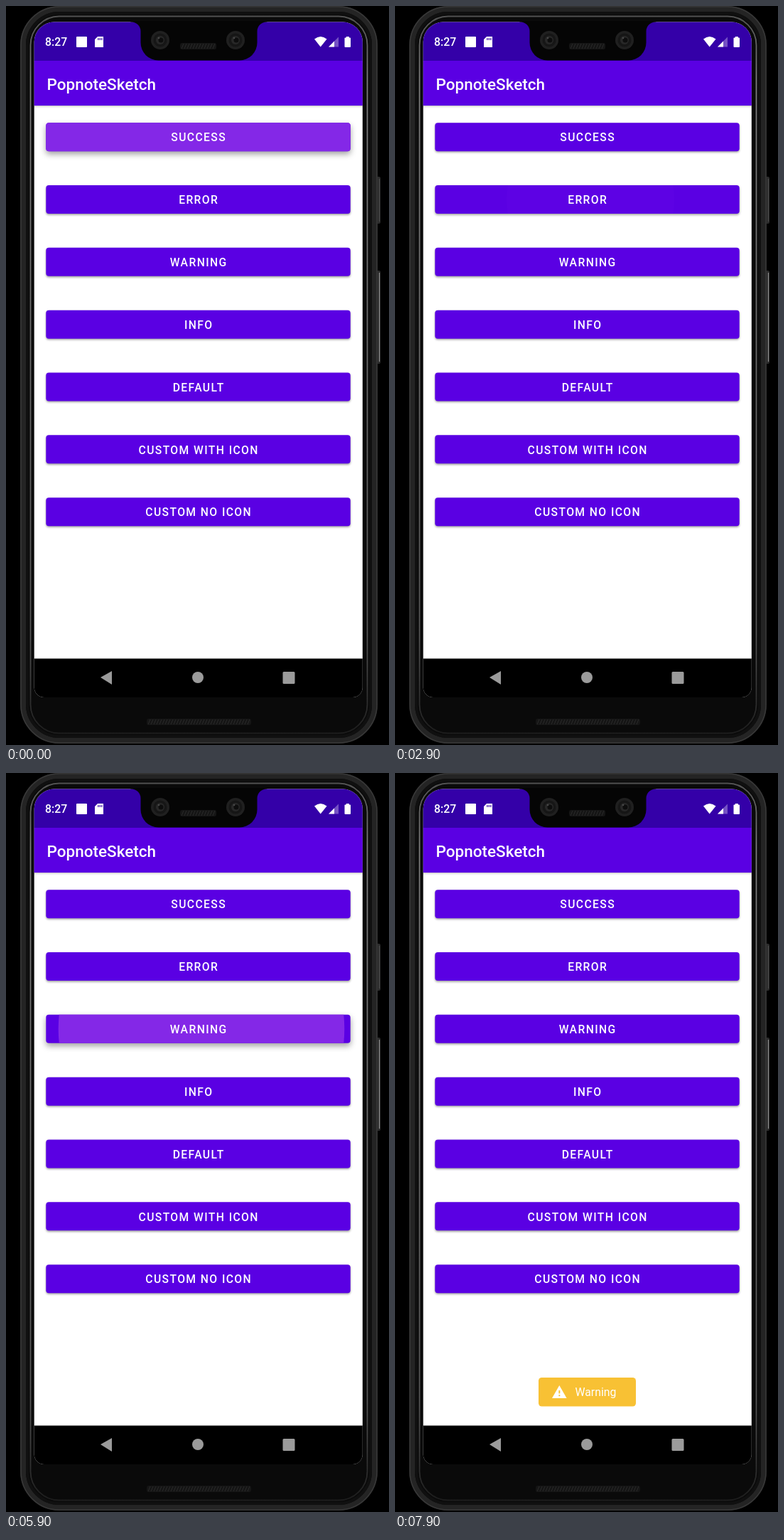
These frames come from a looping animation (539 by 1039 pixels, 8 s). An HTML page with a canvas:

```html
<!DOCTYPE html>
<html lang="en">
<head>
<meta charset="utf-8">
<title>Toast demo</title>
<style>
html, body { margin: 0; width: 100%; height: 100%; overflow: hidden; background: #000; }
canvas { display: block; width: 539px; height: 1039px; }
</style>
</head>
<body>
<canvas id="stage" width="539" height="1039"></canvas>
<script>
const ctx = document.getElementById('stage').getContext('2d');
const LOOP = 8000, STEP = 100;
const PURPLE = '#5a00e3', PRESSED = '#8428e7', DARK = '#3400a8';
const LABELS = ['SUCCESS', 'ERROR', 'WARNING', 'INFO', 'DEFAULT', 'CUSTOM WITH ICON', 'CUSTOM NO ICON'];
const PRESSES = [{ row: 0, at: -255 }, { row: 1, at: 2895 }, { row: 2, at: 5785 }];
const TOASTS = [
  { text: 'Success', color: '#23c426', x: 201, w: 138, tx: 253, icon: checkIcon, show: 500, hide: 2050, gone: 2450 },
  { text: 'Error', color: '#be2c3c', x: 214, w: 113, tx: 265.5, icon: errorIcon, show: 3700, hide: 5050, gone: 5500 },
  { text: 'Warning', color: '#f8c134', x: 202, w: 137, tx: 253.5, icon: warningIcon, show: 6400, hide: 9000, gone: 9400 }
];

const clamp = v => Math.max(0, Math.min(1, v));
const easeOut = (v, power) => 1 - Math.pow(1 - clamp(v), power);

function rounded(x, y, w, h, r) {
  ctx.beginPath();
  ctx.roundRect(x, y, w, h, r);
}

function box(x, y, w, h, r, color) {
  rounded(x, y, w, h, r);
  ctx.fillStyle = color;
  ctx.fill();
}

function ring(x, y, w, h, r, color, width) {
  rounded(x, y, w, h, r);
  ctx.strokeStyle = color;
  ctx.lineWidth = width;
  ctx.stroke();
}

function disc(x, y, r, color) {
  ctx.beginPath();
  ctx.arc(x, y, r, 0, Math.PI * 2);
  ctx.fillStyle = color;
  ctx.fill();
}

function trace(points) {
  ctx.beginPath();
  points.forEach(([x, y]) => ctx.lineTo(x, y));
}

function poly(points, color) {
  trace(points);
  ctx.closePath();
  ctx.fillStyle = color;
  ctx.fill();
}

function line(points, color, width) {
  trace(points);
  ctx.strokeStyle = color;
  ctx.lineWidth = width;
  ctx.stroke();
}

function label(text, x, y, size, weight, spacing = 0, align = 'left') {
  ctx.font = `${weight} ${size}px Roboto, sans-serif`;
  ctx.letterSpacing = spacing + 'px';
  ctx.textAlign = align;
  ctx.fillStyle = '#fff';
  ctx.fillText(text, x, y);
}

function withShadow(alpha, blur, dy, draw) {
  ctx.save();
  ctx.shadowColor = `rgba(0,0,0,${alpha})`;
  ctx.shadowBlur = blur;
  ctx.shadowOffsetY = dy;
  draw();
  ctx.restore();
}

function mesh(x, y, w, h) {
  box(x, y, w, h, 3, '#151515');
  for (let i = 2; i < w - 2; i += 4) {
    line([[x + i, y + h - 1], [x + i + 3, y + 1]], '#2a2a2a', 1);
  }
}

// A rounded outline that follows the phone's edge at a given inset.
function rim(inset, color, width) {
  ring(20 + inset, inset, 503 - inset * 2, 1037 - inset * 2, 55 - inset, color, width);
}

function drawBody() {
  ctx.fillStyle = '#000';
  ctx.fillRect(0, 0, 539, 1039);
  for (const [y, h, color] of [[240, 66, '#4a4a4a'], [372, 131, '#8c8c8c']]) {
    box(521, y, 6, h, 2, '#2c2c2c');
    line([[525.5, y + 3], [525.5, y + h - 3]], color, 1.2);
  }
  box(20, 0, 503, 1037, 55, '#0a0a0a');
  rim(4, '#242424', 8);
  rim(1, '#383838', 1.5);
  rim(10, '#101010', 4);
  const shine = ctx.createLinearGradient(0, 0, 0, 1039);
  shine.addColorStop(0, '#4a4a4a');
  shine.addColorStop(0.1, '#7c7c7c');
  shine.addColorStop(0.85, '#555');
  shine.addColorStop(1, '#161616');
  rim(14.5, shine, 1.8);
  mesh(198, 1002, 147, 9);
}

function drawStatus() {
  ctx.fillStyle = DARK;
  ctx.fillRect(39, 22, 464, 55);
  label('8:27', 55, 56, 15.8, 500);
  box(99, 43, 15, 15, 1, '#fff');

  poly([[129, 43], [137, 43], [137, 58], [125, 58], [125, 47]], '#fff');
  for (let i = 0; i < 3; i++) {
    ctx.fillStyle = DARK;
    ctx.fillRect(129.2 + i * 2.5, 45, 1.2, 3);
  }

  ctx.beginPath();
  ctx.moveTo(434, 46.5);
  ctx.quadraticCurveTo(442.7, 39.5, 451.5, 46.5);
  ctx.lineTo(442.7, 57.5);
  ctx.closePath();
  ctx.fillStyle = '#fff';
  ctx.fill();

  poly([[454, 57.5], [468, 43.5], [468, 57.5]], 'rgba(255,255,255,.32)');
  poly([[454, 57.5], [462, 49.5], [462, 57.5]], '#fff');
  box(476.5, 44.5, 8.5, 13.5, 1, '#fff');
  box(478.8, 43, 4, 2, 0, '#fff');
}

function drawNotch() {
  ctx.beginPath();
  ctx.moveTo(172, 21);
  ctx.lineTo(176, 22.5);
  ctx.arcTo(189.5, 22.5, 189.5, 36, 13);
  ctx.arcTo(189.5, 76.5, 216, 76.5, 25);
  ctx.arcTo(353.5, 76.5, 353.5, 50, 25);
  ctx.arcTo(353.5, 22.5, 367, 22.5, 13);
  ctx.lineTo(371, 21);
  ctx.closePath();
  ctx.fillStyle = '#050505';
  ctx.fill();
  for (const x of [217, 323]) {
    disc(x, 48, 13, '#202020');
    disc(x, 48, 9.5, '#161616');
    disc(x, 48, 6, '#282828');
    disc(x + 1, 48, 3.5, '#0d0d0d');
    disc(x - 2, 45, 1.3, '#484848');
  }
  mesh(245, 52, 51, 9);
}

function drawNav() {
  ctx.fillStyle = '#000';
  ctx.fillRect(39, 917.5, 464, 55);
  poly([[133, 944], [149, 935], [149, 954]], '#9b9b9b');
  disc(270, 944, 8, '#9b9b9b');
  box(389.5, 936, 17, 17, 1.5, '#9b9b9b');
}

function pressState(row, t) {
  for (const p of PRESSES) {
    const age = t - p.at;
    if (p.row !== row || age < 0 || age > 600) continue;
    const fade = 1 - clamp((age - 300) / 290);
    return {
      alpha: clamp(age / 75) * fade,
      lift: clamp(age / 100) * fade,
      radius: 112 + 108 * easeOut(age / 260, 3)
    };
  }
  return null;
}

function drawButton(row, t) {
  const x = 56.3, y = 164.2 + row * 87.83, w = 428.4, h = 40;
  const press = pressState(row, t);
  const lift = press ? press.lift : 0;
  withShadow(0.38, 3 + lift * 6, 1.6 + lift * 2.4, () => box(x, y, w, h, 4, PURPLE));
  if (press) {
    ctx.save();
    rounded(x, y, w, h, 4);
    ctx.clip();
    ctx.globalAlpha = press.alpha;
    disc(275, y + h / 2, press.radius, PRESSED);
    ctx.restore();
  }
  label(LABELS[row], x + w / 2 + 0.7, y + 26.2, 15.7, 500, 1.4, 'center');
}

function checkIcon() {
  line([[222.5, 870.5], [227.8, 875.8], [238.8, 864.8]], '#fff', 1.8);
}

function errorIcon() {
  ring(234, 861, 18, 18, 9, '#fff', 1.9);
  ctx.fillStyle = '#fff';
  ctx.fillRect(242, 865.3, 2, 6);
  ctx.fillRect(242, 873, 2, 2);
}

function warningIcon(color) {
  poly([[221, 879], [231.3, 861], [241.6, 879]], '#fff');
  ctx.fillStyle = color;
  ctx.fillRect(230.4, 868, 1.9, 4.4);
  ctx.fillRect(230.4, 874.2, 1.9, 2);
}

// The toast fades as one layer: over a white page, a white veil does the same.
function drawToast(toast, t) {
  const shown = easeOut((t - toast.show) / 300, 1.7);
  const alpha = shown * (1 - clamp((t - toast.hide) / (toast.gone - toast.hide)));
  if (alpha <= 0) return;
  box(toast.x, 850, toast.w, 40.5, 4.5, toast.color);
  toast.icon(toast.color);
  label(toast.text, toast.tx, 876, 15.8, 400);
  ctx.fillStyle = `rgba(255,255,255,${1 - alpha})`;
  ctx.fillRect(toast.x - 2, 848, toast.w + 4, 45);
}

function drawScreen(t) {
  ctx.save();
  rounded(39.7, 22.5, 462.1, 949.5, [28, 28, 14, 14]);
  ctx.clip();
  ctx.fillStyle = '#fff';
  ctx.fillRect(39, 22, 464, 950);
  withShadow(0.4, 3.5, 1.2, () => box(30, 77, 482, 63, 0, PURPLE));
  drawStatus();
  label('PopnoteSketch', 57.5, 118, 22.5, 500);
  LABELS.forEach((_, row) => drawButton(row, t));
  TOASTS.forEach(toast => drawToast(toast, t));
  drawNav();
  ctx.restore();
  drawNotch();
}

let start = null;
function frame(now) {
  if (start === null) start = now;
  const t = Math.floor(((now - start) % LOOP) / STEP) * STEP;
  drawBody();
  drawScreen(t);
  requestAnimationFrame(frame);
}
requestAnimationFrame(frame);
</script>
</body>
</html>
```
